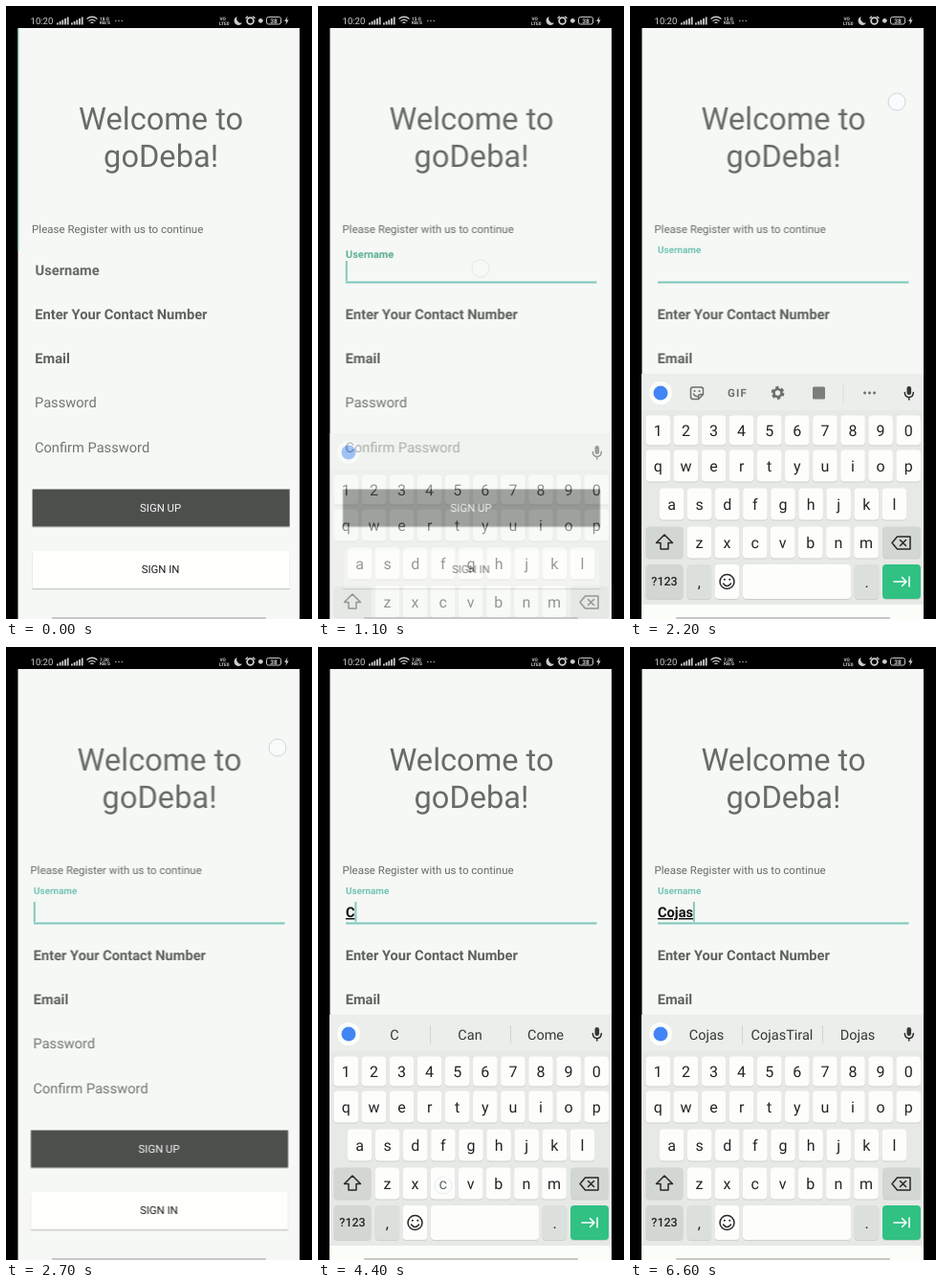
Recreate the animation shown at these times as an HTML page. Size 320x640 px, loop 6700 ms.

```html
<!DOCTYPE html>
<html lang="en">
<head>
<meta charset="utf-8">
<title>Sign-up form</title>
<style>
html, body { margin: 0; width: 100%; height: 100%; overflow: hidden; background: #000; }
svg { display: block; width: 320px; height: 640px; font-family: Roboto, Arial, sans-serif; text-rendering: geometricPrecision; }
.mid { text-anchor: middle; }
.title { font-size: 32.6px; fill: #686b68; }
.note { font-size: 11.5px; fill: #686b68; }
.hint { font-size: 14.65px; fill: #727571; }
.bold { font-size: 14.65px; font-weight: 700; fill: #5e615d; }
.btn { font-size: 11.4px; }
.key { font-size: 16px; fill: #222523; }
.word { font-size: 14.5px; fill: #343835; }
.icon { fill: none; stroke: #6c706d; stroke-width: 1.5; stroke-linejoin: round; stroke-linecap: round; }
.dark { stroke: #252826; }
#typed { font-size: 14.65px; font-weight: 700; fill: #111; text-decoration: underline; }
#status { fill: #c9cccb; font-size: 9.6px; }
#status .tiny { font-size: 4.8px; font-weight: 700; }

#page, #edge, #label, #rule, #caret, #kb, #touch { animation: 6.7s step-end infinite; }
#page { animation-name: page; }
#edge { animation-name: edge; }
#label { animation-name: label; transform-origin: 29px 281px; }
#rule { animation-name: rule; }
#caret { animation-name: caret; }
#kb { animation-name: kb; }
#touch { animation-name: touch; }

@keyframes page {
  0% { transform: translateX(1.6px); }
  1.49% { transform: translateX(1px); }
  2.98% { transform: translateX(.5px); }
  4.47%, 100% { transform: none; }
}
@keyframes edge {
  0% { opacity: .7; }
  1.49% { opacity: .4; }
  2.98% { opacity: .2; }
  4.47%, 100% { opacity: 0; }
}
@keyframes label {
  0% { transform: none; fill: #656967; }
  16.41% { transform: translateY(-18px) scale(.748); fill: #5dae96; }
  26.86%, 100% { transform: translateY(-23px) scale(.675); fill: #74c3b6; }
}
@keyframes rule {
  0% { opacity: 0; }
  13.43% { opacity: .4; }
  16.41%, 100% { opacity: 1; }
}
@keyframes caret {
  0% { opacity: 0; }
  16.41% { opacity: 1; }
  28.35% { opacity: 0; }
  37.31% { opacity: 1; }
  44.77% { opacity: 0; }
  49.25% { opacity: 1; }
  55.22% { opacity: 0; }
  64.17%, 100% { opacity: 1; }
}
@keyframes kb {
  0% { transform: translateY(62px); opacity: 0; }
  16.41% { transform: translateY(62px); opacity: .47; }
  26.86% { transform: none; opacity: 1; }
  37.31% { transform: translateY(20px); opacity: .75; }
  38.8% { transform: translateY(62px); opacity: .3; }
  40.29% { transform: translateY(62px); opacity: 0; }
  49.25% { transform: translateY(62px); opacity: .47; }
  50.74% { transform: translateY(12px); opacity: .85; }
  52.23%, 100% { transform: none; opacity: 1; }
}
@keyframes touch {
  0% { transform: translate(170px, 274px); opacity: 0; }
  13.43% { transform: translate(170px, 274px); opacity: .9; }
  16.41% { transform: translate(170px, 274px); opacity: .4; }
  26.86% { transform: translate(279px, 100px); opacity: 0; }
  31.34% { transform: translate(279px, 100px); opacity: .9; }
  32.83% { transform: translate(279px, 100px); opacity: .9; animation-timing-function: linear; }
  40.29% { transform: translate(284px, 105px); opacity: .9; }
  44.77% { transform: translate(175px, 274px); opacity: 0; }
  46.26% { transform: translate(175px, 274px); opacity: .9; }
  49.25% { transform: translate(175px, 274px); opacity: .4; }
  52.23% { transform: translate(175px, 274px); opacity: .06; }
  53.73% { transform: translate(36px, 560px); opacity: 0; }
  55.22% { transform: translate(36px, 560px); opacity: .9; }
  59.7% { transform: translate(131px, 562px); opacity: 0; }
  62.68% { transform: translate(131px, 562px); opacity: .9; }
  65.67% { transform: translate(131px, 562px); opacity: .4; }
  68.65% { transform: translate(262px, 484px); opacity: 0; }
  70.14% { transform: translate(262px, 484px); opacity: .9; }
  73.13% { transform: translate(262px, 484px); opacity: .4; }
  74.62% { transform: translate(218px, 525px); opacity: .9; }
  77.61% { transform: translate(218px, 525px); opacity: .4; }
  79.1% { transform: translate(36px, 532px); opacity: .9; }
  80.59% { transform: translate(36px, 532px); opacity: .5; }
  85.07% { transform: translate(68px, 528px); opacity: .9; }
  86.56% { transform: translate(68px, 528px); opacity: .4; }
  95.52%, 100% { transform: translate(68px, 528px); opacity: 0; }
}
</style>
</head>
<body>
<svg viewBox="0 0 320 640">
  <defs>
    <clipPath id="screen"><rect x="12.5" y="23" width="294.5" height="617"/></clipPath>
  </defs>
  <rect width="320" height="640"/>
  <g clip-path="url(#screen)">
    <rect x="12" y="23" width="296" height="617" fill="#f5f8f4"/>
    <path id="edge" d="M13 23V255" stroke="#7fcfc3" stroke-width="1.4"/>
    <g id="page">
      <text class="title mid" x="160.5" y="129">Welcome to</text>
      <text class="title mid" x="160.5" y="167.5">goDeba!</text>
      <text class="note" x="25.5" y="237.3">Please Register with us to continue</text>
      <text id="label" class="bold" x="29" y="281">Username</text>
      <text id="typed" x="29" y="282"></text>
      <path id="rule" d="M29 288.5H291.5" stroke="#7cc6bb" stroke-width="1.8"/>
      <path id="caret" d="M0 266V287" stroke="#62b9ab" stroke-width="1.5"/>
      <text class="bold" x="28.7" y="327.2">Enter Your Contact Number</text>
      <text class="bold" x="28.7" y="373.2">Email</text>
      <text class="hint" x="28.4" y="419.4">Password</text>
      <text class="hint" x="28.4" y="465.6">Confirm Password</text>
      <rect x="26" y="505.5" width="269" height="39.5" fill="#000" opacity=".12"/>
      <rect x="26" y="504.5" width="269" height="39" fill="#4d4f4d"/>
      <text class="btn mid" x="160" y="528.3" fill="#f4f5f4">SIGN UP</text>
      <rect x="25.5" y="571" width="270" height="39" rx="1" fill="#000" opacity=".06"/>
      <rect x="26" y="570" width="269" height="39" fill="#000" opacity=".12"/>
      <rect x="26" y="569" width="269" height="39" fill="#fefffd"/>
      <text class="btn mid" x="160" y="592.3" fill="#1d1f1e">SIGN IN</text>
    </g>

    <g id="kb">
      <rect x="12" y="384" width="296" height="320" fill="#e6e9e5"/>
      <rect x="12" y="384" width="296" height="38" fill="#ebeeea"/>
      <rect x="12" y="625" width="296" height="80" fill="#fbfdf9"/>
      <circle cx="32" cy="404" r="12" fill="#fdfefc"/>
      <circle cx="32" cy="404" r="7.5" fill="#4285f4"/>
      <g id="tools">
        <g class="icon">
          <path d="M66 398h8q2.500 0 2.500 2.500v5l-5 5h-5.500q-2.500 0-2.500-2.500v-7.500q0-2.500 2.500-2.500zM76 405.500h-2.500q-2 0-2 2v2.500M66.500 405q1 2.500 3.500 2.500"/>
          <path d="M67.500 402h.1M72.500 402h.1" stroke-width="2"/>
          <circle cx="154.500" cy="404" r="4" stroke-width="2.600"/>
          <circle cx="154.500" cy="404" r="5.800" stroke-width="2.200" stroke-dasharray="3.400 2.674" stroke-linecap="butt"/>
          <path d="M245.500 404h.1M250.500 404h.1M255.500 404h.1" stroke-width="2.800"/>
          <path d="M223 395V414" stroke="#d9dcd8" stroke-width="1"/>
        </g>
        <text class="mid" x="112.500" y="408" font-size="11.500" font-weight="700" letter-spacing="1.200" fill="#6c706d">GIF</text>
        <rect x="191" y="397.500" width="13" height="13" rx="1.500" fill="#7b7f7c"/>
      </g>
      <g id="strip">
        <path d="M117.500 395V414M201.500 395V414" stroke="#d1d5d1"/>
        <text class="word mid" x="80" y="409.500"></text>
        <text class="word mid" x="159" y="409.500"></text>
        <text class="word mid" x="238" y="409.500"></text>
      </g>
      <rect x="289.500" y="397" width="4.600" height="9" rx="2.300" fill="#343835"/>
      <path class="icon dark" d="M287.300 403.500q.3 5 4.500 5t4.500-5M291.800 408.500v2.500" stroke-width="1.300"/>
      <g id="keys"></g>
      <path class="icon dark" d="M36 552l8.500 8.500h-4.500v6.500h-8v-6.500h-4.500z"/>
      <path class="icon dark" d="M279.500 554h13.500v13h-13.500l-5.500-6.500zM282.500 557.500l6 6M288.500 557.500l-6 6"/>
      <g class="icon dark">
        <circle cx="101.500" cy="601" r="7.500"/>
        <path d="M97.500 603q4 5 8 0"/>
        <path d="M98.800 598.700h.1M104.200 598.700h.1" stroke-width="2"/>
      </g>
      <path class="icon" style="stroke:#fff" d="M276 601h13M284.500 596.500l4.500 4.500l-4.500 4.500M292 596v10"/>
    </g>
    <rect x="48" y="638" width="224" height="3" rx="1" fill="#c5c8c4"/>
    <g id="touch"><circle r="9" fill="#fbfcff" fill-opacity=".8" stroke="#c9cdd6"/></g>
  </g>

  <g id="status">
    <text x="25.500" y="18.800">10:20</text>
    <g id="bars"></g>
    <g fill="none" stroke="#c9cccb" stroke-width="1.300">
      <path d="M84.500 13.500q5.500-4.500 11 0M86.500 15.700q3.500-2.800 7 0M88.500 17.800q1.500-1.200 3 0"/>
      <circle cx="255.500" cy="15.500" r="3.400" stroke-width="1.800"/>
      <path d="M250.500 13l2.500-2.300M260.500 13l-2.500-2.300"/>
      <rect x="272.500" y="11.500" width="15" height="7.500" rx="2" stroke-width="1"/>
    </g>
    <text id="speed" class="tiny" x="98" y="14.800">15.0</text>
    <text class="tiny" x="98" y="19.300">KB/S</text>
    <path d="M114 15.500h1.500M117.300 15.500h1.500M120.600 15.500h1.500" stroke="#8f9291" stroke-width="1.300"/>
    <text class="tiny" x="223.500" y="14.800">VO</text>
    <text class="tiny" x="223" y="19.500">LTE0</text>
    <path d="M241.500 11a4.600 4.600 0 1 0 5.500 6.700a5 5 0 0 1-5.500-6.700z"/>
    <circle cx="266.300" cy="15.300" r="2.400"/>
    <text class="mid" x="280" y="17.600" font-size="6.500" font-weight="700">38</text>
    <path d="M294.500 10.500l-3.300 5.500h2l-.8 4l3.200-5.500h-2z"/>
  </g>
</svg>
<script>
const $ = id => document.getElementById(id);
const add = (parent, tag, attrs, text = '') => {
  const el = document.createElementNS('http://www.w3.org/2000/svg', tag);
  for (const name in attrs) el.setAttribute(name, attrs[name]);
  el.textContent = text;
  parent.append(el);
  return el;
};

const keys = $('keys'), letters = [];
function key(cx, cy, w, h, fill, text = '', size = 16) {
  const box = { x: cx - w / 2, width: w, height: h, rx: 4 };
  add(keys, 'rect', { ...box, y: cy - h / 2 + 1, fill: '#cdd0cc' });
  add(keys, 'rect', { ...box, y: cy - h / 2, fill });
  return add(keys, 'text', { class: 'key mid', x: cx, y: cy + size * .345, style: `font-size:${size}px` }, text);
}
const white = '#fdfefc', grey = '#d3d7d3', pale = '#dce0dc';
const rows = [['1234567890', 29.3, 443, 31], ['qwertyuiop', 29.3, 480, 33], ['asdfghjkl', 43.6, 520, 33], ['zxcvbnm', 72.4, 560, 33]];
for (const [chars, x, y, h] of rows) {
  [...chars].forEach((c, i) => letters.push(key(x + i * 29.1, y, 25.5, h, white, c)));
}
key(36, 560, 39, 33, grey);
key(284, 560, 40, 33, grey);
key(36, 601, 39, 36, grey, '?123', 12.5).setAttribute('font-weight', 500);
key(72.4, 601, 25.5, 36, pale, ',');
key(101.5, 601, 25.5, 36, white);
key(174.5, 601, 113, 36, white);
key(247.5, 601, 25.5, 36, pale, '.');
key(284, 601, 40, 36, '#30c183');

for (const x of [53, 68]) {
  for (let i = 0; i < 5; i++) {
    const h = 2 + i * 1.5;
    add($('bars'), 'rect', { x: x + i * 2.7, y: 19.5 - h, width: 1.8, height: h });
  }
}

// start time, typed text, suggestions, shift
const states = [
  [0, ''],
  [3800, '', null, true],
  [4300, 'C', ['C', 'Can', 'Come']],
  [4800, 'Co', ['Co', 'Come', 'Could']],
  [5100, 'Coj', ['Coj', 'Cojas', 'Coin']],
  [5400, 'Coja', ['Coja', 'Cojas', 'CojasTiral']],
  [5800, 'Cojas', ['Cojas', 'CojasTiral', 'Dojas']]
];
const lead = 20; // covers the delay until the next paint
const typed = $('typed'), words = $('strip').querySelectorAll('text');
const clock = $('kb').getAnimations()[0];
const show = (el, on) => el.style.visibility = on ? 'visible' : 'hidden';

function draw() {
  const t = ((clock.currentTime || 0) + lead) % 6700;
  const [, text, tips, shift] = states.filter(s => s[0] <= t).pop();
  typed.textContent = text;
  const end = text ? typed.getComputedTextLength() + .8 : .8;
  $('caret').setAttribute('transform', `translate(${29 + end} 0)`);
  show($('tools'), !tips && t >= 1800);
  show($('strip'), tips);
  words.forEach((w, i) => w.textContent = tips ? tips[i] : '');
  letters.forEach(el => {
    const c = el.textContent;
    el.textContent = shift ? c.toUpperCase() : c.toLowerCase();
  });
  $('speed').textContent = t < 100 ? '18.0' : t < 2500 ? '15.0' : '7.00';
  requestAnimationFrame(draw);
}
draw();
</script>
</body>
</html>
```
